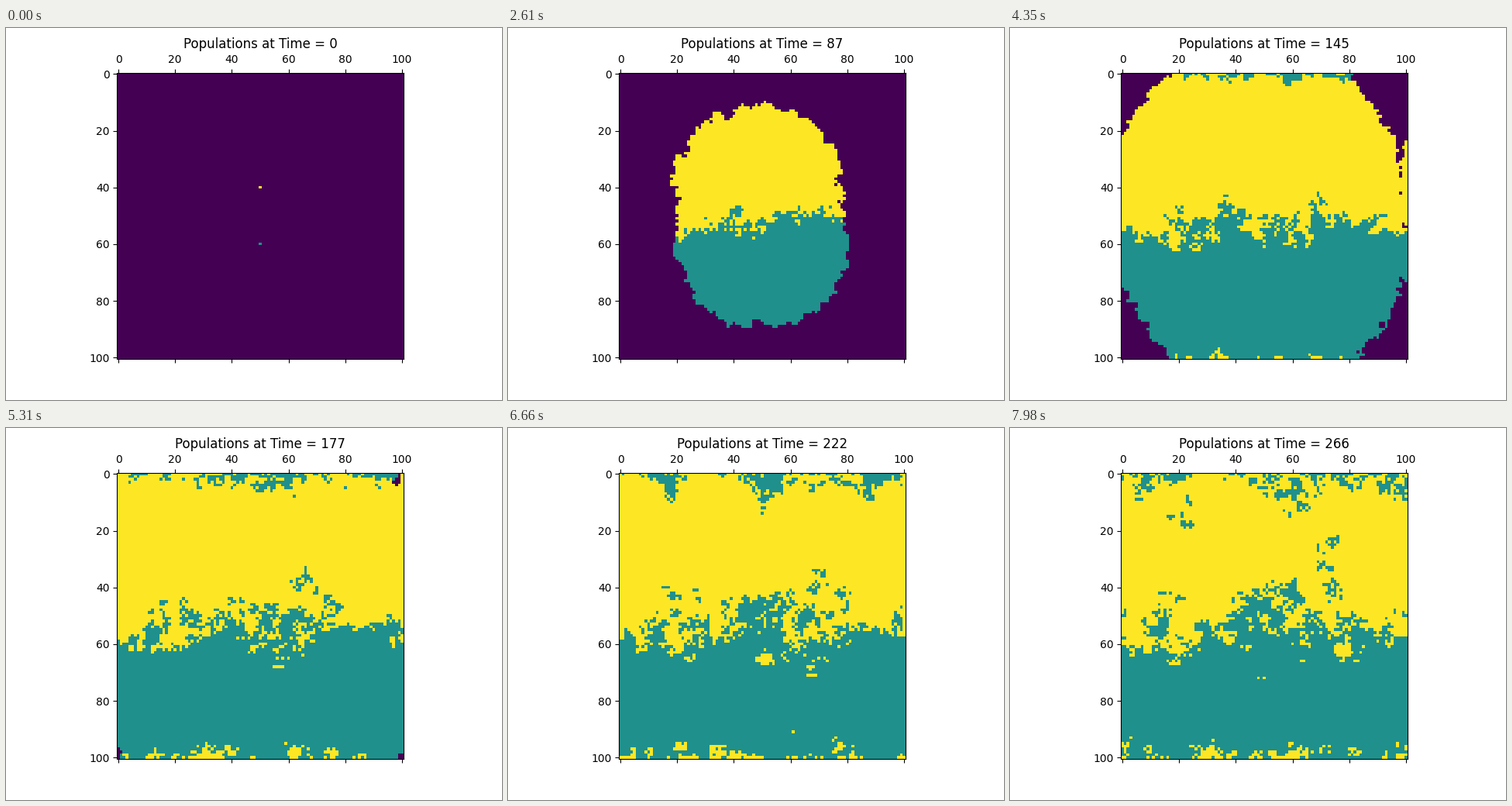
These frames come from a looping animation (640x480 px, 8 s). A matplotlib script:

```python
import numpy as np
import matplotlib.pyplot as plt
from matplotlib.animation import FuncAnimation

N = 101            # grid side, edges wrap around
STEPS = 267
STEP_MS, TICK_MS = 30, 20
SPEED = 0.37       # growth in cells per step
SWAP = 0.6         # chance that a cell copies a random neighbour
EMPTY, LOWER, UPPER = 0, 1, 2

rng = np.random.default_rng(12)
rows, cols = np.mgrid[0:N, 0:N]


def shifted(a):
    """The grid as seen from each of the four neighbours."""
    return [np.roll(a, s, axis) for axis in (0, 1) for s in (-1, 1)]


def arrival(col, row, lean):
    """Time at which a colony reaches each cell; lean slows it to the upper right."""
    best = np.full((N, N), np.inf)
    for ox in (-N, 0, N):
        for oy in (-N, 0, N):
            x, y = cols - col + ox, rows - row + oy
            r = np.hypot(x, y)
            speed = SPEED * (1 - lean * np.cos(np.arctan2(y, x) + 0.7))
            best = np.minimum(best, r / speed + rough * np.minimum(1, r / 6))
    return best


def simulate():
    upper = arrival(50, 40, 0.07)
    lower = arrival(50, 60, 0)
    born = np.minimum(upper, lower)

    # The colonies meet on a gentle wave in the middle, else first come first served
    meet = 53.5 + 4 * np.cos(2 * np.pi * (cols - 16) / N)
    middle = abs(rows - 50) < 25
    owner = np.where(np.where(middle, rows < meet, upper < lower), UPPER, LOWER)

    grid = np.where(born <= 0, owner, EMPTY)
    states = [grid]
    for t in range(1, STEPS):
        near = np.choose(rng.integers(0, 4, (N, N)), shifted(grid))
        swap = (grid != EMPTY) & (near != EMPTY) & (rng.random((N, N)) < SWAP)
        grow = (grid == EMPTY) & (near != EMPTY) & (born <= t)
        grid = np.where(swap, near, np.where(grow, owner, grid))
        states.append(grid)
    return states


noise = rng.normal(size=(N, N))
rough = 1.5 * (noise + sum(shifted(noise)))
states = simulate()

fig, ax = plt.subplots(figsize=(6.4, 4.8), dpi=100)
image = ax.matshow(states[0], cmap="viridis", vmin=EMPTY, vmax=UPPER)
title = ax.set_title("Populations at Time = 0")


def update(tick):
    step = (tick * TICK_MS + TICK_MS // 2) // STEP_MS
    image.set_data(states[step])
    title.set_text(f"Populations at Time = {step}")
    return image, title


anim = FuncAnimation(fig, update, frames=400, interval=TICK_MS,
                     repeat=True, repeat_delay=0, blit=False)
plt.show()
```
